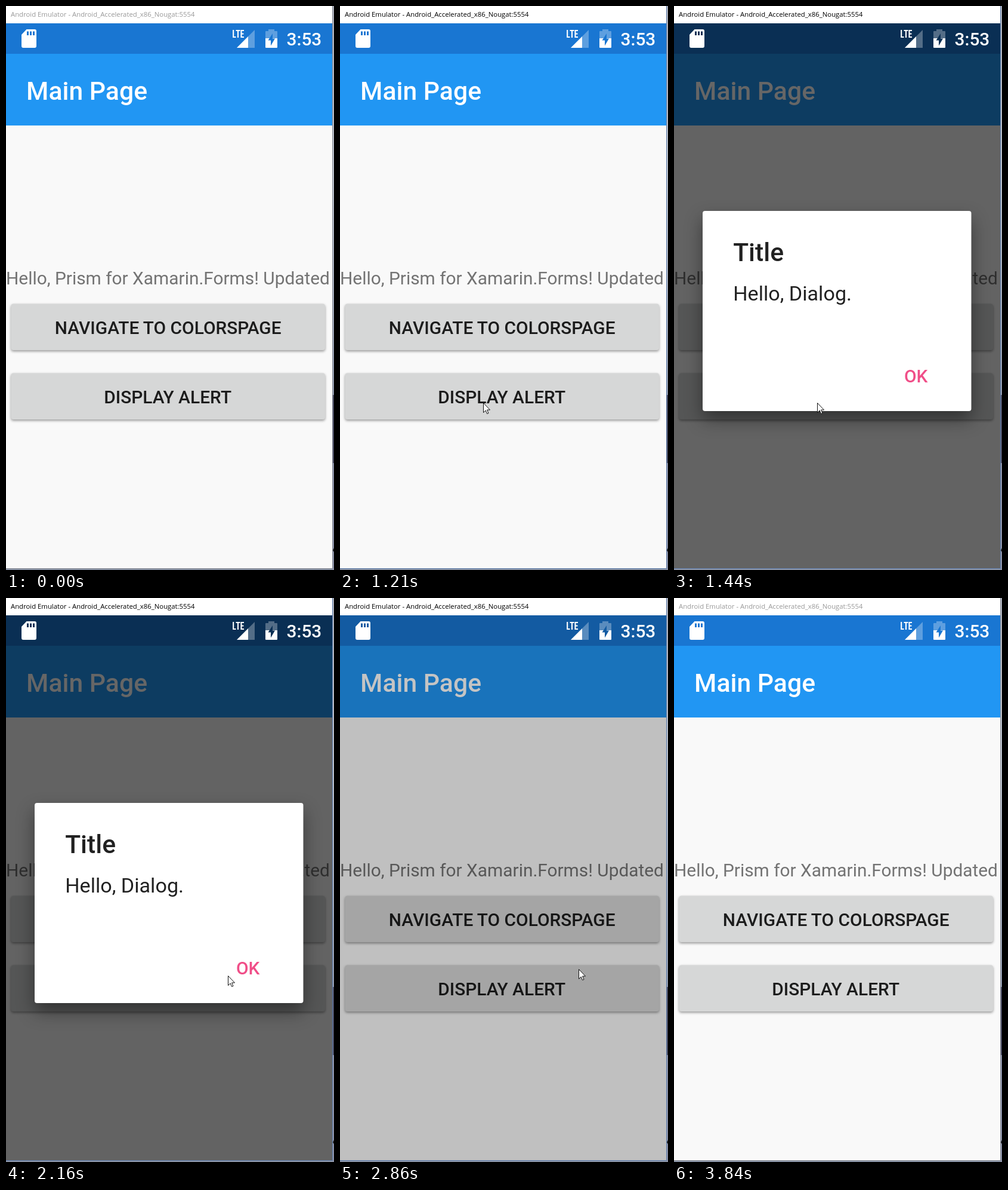
An HTML page that plays this animation: 550 px wide and 944 px high, repeating every 4.01 s.

```html
<!DOCTYPE html>
<html lang="en">
<head>
<meta charset="utf-8">
<title>Dialog demo</title>
<style>
  html, body { margin: 0; height: 100%; overflow: hidden; }
  svg { display: block; width: 100vw; height: 100vh; }
  text { font: 29.87px Roboto, sans-serif; }
  .medium { font-weight: 500; }
  .big { font-size: 42.67px; }
  .mid { text-anchor: middle; }
  .button { fill: #d6d7d7; filter: drop-shadow(0 2px 2px rgba(0,0,0,.4)); }
  #caption { font: 11.33px "Open Sans", "Noto Sans", sans-serif; }
  #panel { filter: drop-shadow(0 14px 15px rgba(0,0,0,.42)); }
</style>
</head>
<body>
<svg viewBox="0 0 550 944">
  <defs>
    <linearGradient id="desk" x2="0" y2="1">
      <stop offset="0" stop-color="#a9adb8"/>
      <stop offset=".3" stop-color="#b9bfc9"/>
      <stop offset=".69" stop-color="#8f98ab"/>
      <stop offset=".69" stop-color="#4a4c62"/>
      <stop offset=".81" stop-color="#4a4c62"/>
      <stop offset=".81" stop-color="#8a90a5"/>
    </linearGradient>
    <linearGradient id="charge" x2="0" y2="1">
      <stop offset=".48" stop-color="#fff" stop-opacity=".3"/>
      <stop offset=".48" stop-color="#fff"/>
    </linearGradient>
  </defs>

  <!-- desktop and window -->
  <rect width="550" height="944" fill="#8a93a5"/>
  <rect x="547" width="3" height="944" fill="url(#desk)"/>
  <path d="M550 907l-2 4 2 3z" fill="#111"/>
  <path id="border" d="M547.5 0V941.5H0" fill="none"/>
  <rect width="547" height="29" fill="#fff"/>
  <text id="caption" x="8" y="18">Android Emulator - Android_Accelerated_x86_Nougat:5554</text>

  <!-- main page -->
  <rect y="29" width="547" height="912" fill="#f9f9f9"/>
  <rect y="29" width="547" height="52" fill="#1976d2"/>
  <rect y="80" width="547" height="120" fill="#2196f3"/>
  <text class="medium big" x="34.1" y="157" fill="#fff">Main Page</text>
  <text x="0" y="465.5" fill="#737373">Hello, Prism for Xamarin.Forms! Updated</text>
  <rect class="button" x="8.5" y="498.5" width="526.5" height="77.5" rx="4"/>
  <rect class="button" x="8.5" y="614.5" width="526.5" height="77.5" rx="4"/>
  <g class="mid" fill="#1c1c1c">
    <text class="medium" x="271.7" y="549">NAVIGATE TO COLORSPAGE</text>
    <text class="medium" x="271.2" y="664.5">DISPLAY ALERT</text>
  </g>
  <rect id="dim" y="29" width="547" height="912"/>

  <!-- status icons stay bright above the dimming -->
  <g fill="#fff">
    <path fill-rule="evenodd" d="M34.5 39H48q3 0 3 3v25q0 3-3 3H29q-3 0-3-3V48zM35 42.5v6.5h3v-6.5zM40 42.5v6.5h3v-6.5zM45 42.5v6.5h3v-6.5z"/>
    <path d="M381.2 40v12h4.3M385.5 41h7M389 41v12M399 41h-4.5v11H399M394.5 46.5h4" fill="none" stroke="#fff" stroke-width="2.1"/>
    <path d="M387 70L417 40V70z" opacity=".3"/>
    <path d="M387 70L406 51V70z"/>
    <path fill="url(#charge)" fill-rule="evenodd" d="M440 39h10v3h4q1 0 1 1v26q0 1-1 1H436q-1 0-1-1V43q0-1 1-1h4zM447 46l-7.5 11.5h4.5v9l7-12h-4z"/>
    <text class="medium" x="470.5" y="66">3:53</text>
  </g>

  <g id="dialog">
    <rect id="panel" x="48" y="343" width="450.5" height="335" rx="4" fill="#fff"/>
    <g fill="#212121">
      <text class="medium big" x="99.2" y="427">Title</text>
      <text x="99.2" y="492.5" style="font-size:34.13px">Hello, Dialog.</text>
    </g>
    <text class="medium mid" x="405.7" y="630" fill="#f04e88">OK</text>
  </g>

  <path id="cursor" d="M.5 .5V16.5L4.2 13 6.6 18.5 9 17.5 6.6 12H11.5z" fill="#fff" stroke="#111"/>
</svg>
<script>
const LOOP = 4010, FRAME = 77.8, ENTER = 190, LEAVE = 3380;
const $ = id => document.getElementById(id);
const set = (id, name, value) => $(id).setAttribute(name, value);

const ramp = (k, from, length) => Math.min(1, Math.max(0, (k - from) / length));
// soft start grows with a, soft landing with b
const ease = (p, a, b) => 1 - (1 - p ** a) ** b;
const mix = (from, to, p) => Math.round(from + (to - from) * p);

// pointer glides, k counts screen refreshes since it entered
function pointer(k) {
  const toButton = ramp(k, 0, 6.6), toOk = ramp(k, 19, 10), away = ramp(k, 34, 6);
  if (away) return [mix(400, 503, ease(away, 3.5, 2.5)), mix(621, 925, ease(away, 3, 4))];
  if (toOk) return [mix(240, 400, ease(toOk, 1, 1.9)), mix(664, 621, ease(toOk, 1, 1.5))];
  return [mix(405, 240, ease(toButton, 1, 5)), mix(910, 664, ease(toButton, 1, 2))];
}

function draw(t) {
  const k = Math.floor((t - ENTER) / FRAME);
  const open = ramp(k, 13, 3);
  set('dim', 'opacity', .6 * (open - ramp(k, 32, 3) ** 1.2));
  set('dialog', 'opacity', open - ramp(k, 32, 1.43));

  const active = t >= 1050 && t < 3840;
  set('caption', 'fill', active ? '#000' : '#999');
  set('border', 'stroke', active ? '#5f7fae' : '#8b8f98');

  set('cursor', 'visibility', t >= ENTER && t < LEAVE ? 'visible' : 'hidden');
  set('cursor', 'transform', `translate(${pointer(k)})`);
}

const start = performance.now();
function tick() {
  draw((performance.now() - start) % LOOP);
  requestAnimationFrame(tick);
}
tick();
</script>
</body>
</html>
```
